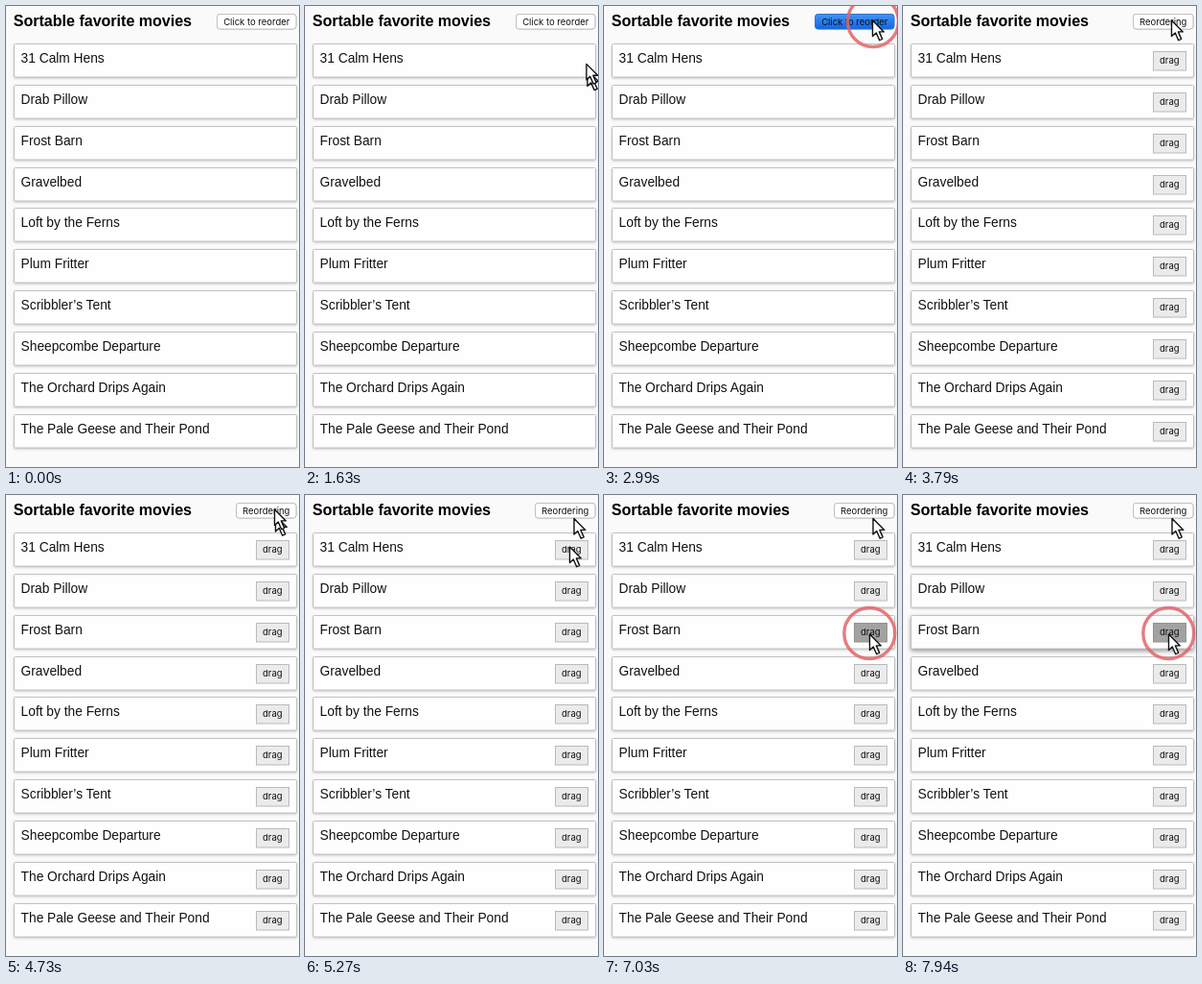
An HTML page for the animation above (8000 ms loop, 306 by 480 pixels).

```html
<!DOCTYPE html>
<html>
<head>
<meta charset="utf-8">
<style>
  html, body { margin: 0; width: 100%; height: 100%; overflow: hidden; background: #fafafa; }
  svg { display: block; width: 306px; height: 480px; }
  text { fill: #111; font: 13.75px "Liberation Sans", Arial, sans-serif; }
  .title { fill: #000; font-weight: bold; font-size: 16.05px; }
  .label { font: 9.5px Inter, Roboto, sans-serif; text-anchor: middle; }
  .row { fill: #fefefe; stroke: #c2c2c2; filter: drop-shadow(0 1px 1px rgba(0, 0, 0, .2)); }
  .lifted .row { filter: drop-shadow(0 2px 2px rgba(0, 0, 0, .4)); }
  .drag rect { fill: #ebebeb; stroke: #bababa; }
  .held .drag rect { fill: #a2a2a2; stroke: #929292; }
  .button { fill: #fff; stroke: #c0c0c0; filter: drop-shadow(0 .5px .4px rgba(0, 0, 0, .25)); }
  .pressed .button { fill: url(#blue); stroke: #2f73cf; }
  .ring { fill: none; stroke: #e2666a; stroke-opacity: .85; stroke-width: 3.4; }
  .cursor { fill: #fff; stroke: #111; stroke-width: 1.4; stroke-linejoin: round; }
</style>
</head>
<body>
<svg viewBox="0 0 306 480">
  <defs>
    <linearGradient id="blue" x2="0" y2="1">
      <stop stop-color="#4394f4"/><stop offset="1" stop-color="#1065e6"/>
    </linearGradient>
    <path id="arrow" d="M0 0V16.5L3.8 13L7.2 20.7L10.2 19.4L6.9 11.9H11.8Z"/>
  </defs>
  <text class="title" x="7.8" y="21">Sortable favorite movies</text>
  <g id="rows"></g>
  <g id="toggle">
    <rect class="button" y="8.5" height="15.5" rx="3"/>
    <text class="label" y="19.7"></text>
  </g>
  <circle id="ring" class="ring" r="26.5"/>
  <use id="stuck" class="cursor" href="#arrow" x="281" y="24.5"/>
  <g id="pointer" class="cursor">
    <use id="trail" href="#arrow" x="1" y="6.5"/>
    <use href="#arrow"/>
  </g>
</svg>
<script>
const LOOP = 8000, STEP = 140;
const PRESS = 2990, REORDER = 3790, GRAB = 6940, LIFT = 7590;
const $ = id => document.getElementById(id);

const titles = [
  "31 Calm Hens", "Drab Pillow", "Frost Barn", "Gravelbed", "Loft by the Ferns",
  "Plum Fritter", "Scribbler’s Tent", "Sheepcombe Departure",
  "The Orchard Drips Again", "The Pale Geese and Their Pond"
];

$("rows").innerHTML = titles.map((title, i) => `
  <g transform="translate(0 ${Math.round(i * 42.87)})">
    <rect class="row" x="8.5" y="39.5" width="295" height="34.5" rx="1"/>
    <text x="15.6" y="59">${title}</text>
    <g class="drag">
      <rect x="261.5" y="47.5" width="34" height="19.5"/>
      <text class="label" x="278.3" y="60.3">drag</text>
    </g>
  </g>`).join("");

// Pointer strokes: to the toggle, to the first handle, to the third handle
const moves = [
  { start: 1210, end: 1940, from: [302, 132], to: [280.5, 15] },
  { start: 4730, end: 5270, from: [280.5, 15], to: [276.5, 54] },
  { start: 6520, end: 7030, from: [278.5, 98.5], to: [277.5, 145] }
];

const [button, label] = $("toggle").children;
const handles = document.querySelectorAll(".drag");
const grabbed = $("rows").children[2];
const show = (el, on) => el.style.display = on ? "" : "none";
const mix = (a, b, k) => a + (b - a) * k;
const smooth = p => p * p * (3 - 2 * p);

function drawPointer(t) {
  const move = moves.findLast(m => m.start <= t);
  show($("pointer"), move);
  if (!move) return;
  const { start, end, from, to } = move;
  const moving = t < end;
  const elapsed = Math.floor((t - start) / STEP) * STEP;
  const k = moving ? smooth(elapsed / (end - start)) : 1;
  const x = mix(from[0], to[0], k * k), y = mix(from[1], to[1], k);
  $("pointer").setAttribute("transform", `translate(${x} ${y})`);
  show($("trail"), moving);
}

function draw(t) {
  const reordering = t >= REORDER, held = t >= GRAB;
  const pressed = t >= PRESS && !reordering;

  const left = reordering ? 240.5 : 220.5;
  button.setAttribute("x", left);
  button.setAttribute("width", 303 - left);
  label.setAttribute("x", (left + 303) / 2);
  label.textContent = reordering ? "Reordering" : "Click to reorder";
  $("toggle").classList.toggle("pressed", pressed);

  handles.forEach(handle => show(handle, reordering));
  grabbed.classList.toggle("held", held);
  grabbed.classList.toggle("lifted", t >= LIFT);

  show($("ring"), pressed || held);
  $("ring").setAttribute("cx", held ? 277.3 : 281);
  $("ring").setAttribute("cy", held ? 144 : 16);

  show($("stuck"), t >= moves[1].start + STEP);
  drawPointer(t);
}

function tick() {
  draw(performance.now() % LOOP);
  requestAnimationFrame(tick);
}
tick();
</script>
</body>
</html>
```
